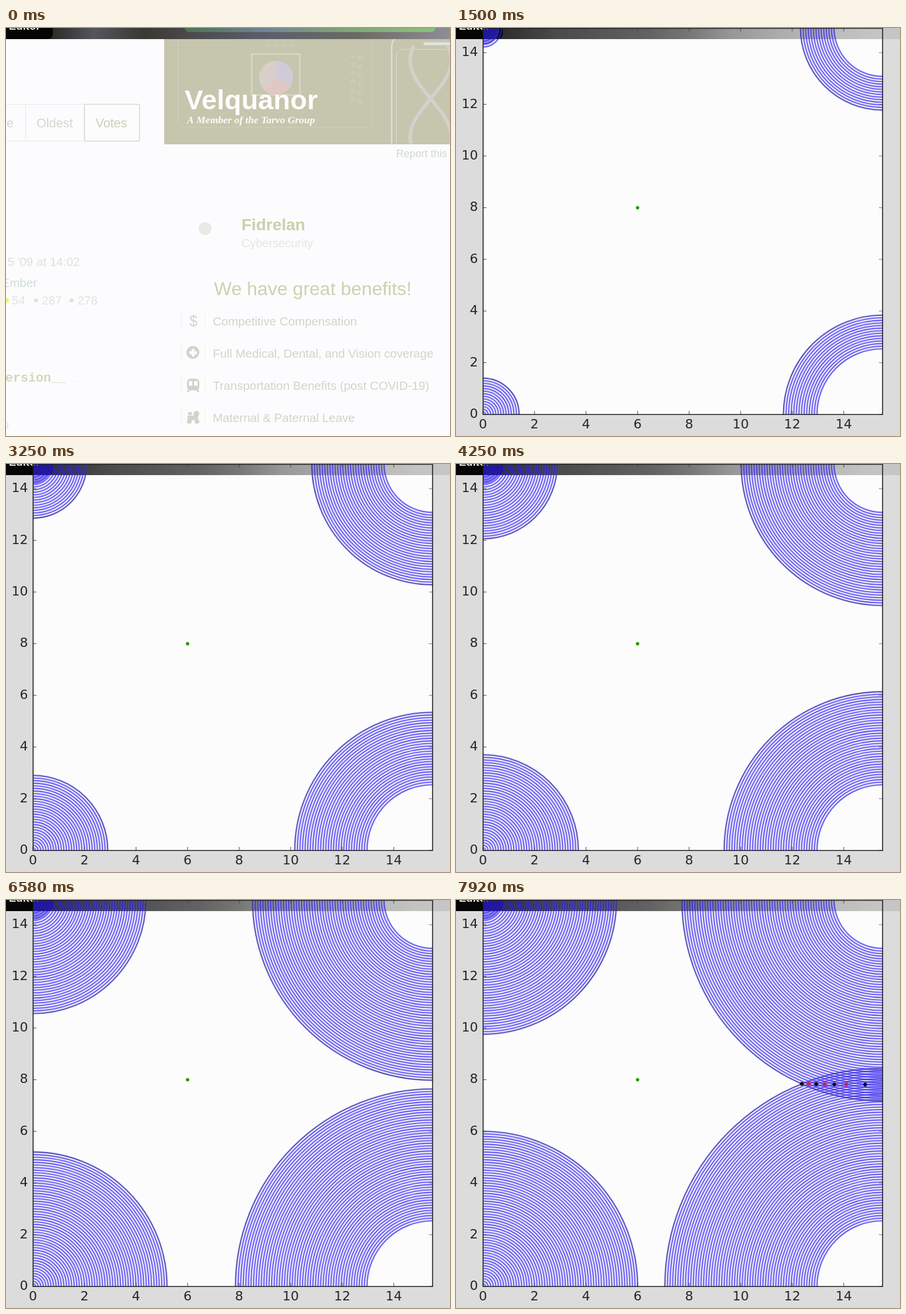
These frames come from a looping animation (758x698 px, 8 s). An HTML page with a canvas:

```html
<!DOCTYPE html>
<html lang="en">
<head>
<meta charset="utf-8">
<style>
  html, body { margin: 0; width: 100%; height: 100%; overflow: hidden; background: #dcdcdc; }
  canvas { display: block; }
</style>
</head>
<body>
<canvas id="stage" width="758" height="698"></canvas>
<script>
const g = document.getElementById('stage').getContext('2d');
const LOOP = 8000, PAGE_END = 80;
const SANS = '"Liberation Sans", Arial, sans-serif';
const SERIF = '"Liberation Serif", Times, serif';
const MONO = '"Liberation Mono", monospace';
const AXIS = '"DejaVu Sans", sans-serif';

// Plot box and units
const L = 46, R = 728, B = 661, UX = 44, UY = 44.2;
const px = x => L + x * UX, py = y => B - y * UY;

// Wave sources: centre and radius before the first ring
const sources = [
  { x: 0, y: 0, r: 0 },
  { x: 15.5, y: 0, r: 2.44 },
  { x: 15.5, y: 14.96, r: 1.78 },
  { x: 0, y: 14.94, r: -0.82 }
];

function rect(x, y, w, h, color) {
  g.fillStyle = color;
  g.fillRect(x, y, w, h);
}

function text(s, x, y, font, color, align = 'left') {
  g.font = font;
  g.fillStyle = color;
  g.textAlign = align;
  g.fillText(s, x, y);
}

function dot(x, y, r, color) {
  g.fillStyle = color;
  g.beginPath();
  g.arc(x, y, r, 0, 7);
  g.fill();
}

function line(color, width, ...pts) {
  g.strokeStyle = color;
  g.lineWidth = width;
  g.beginPath();
  for (let i = 0; i < pts.length; i += 2) g.lineTo(pts[i], pts[i + 1]);
  g.stroke();
}

function box(x, y, w, h, color, radius = 0, width = 1) {
  g.strokeStyle = color;
  g.lineWidth = width;
  g.beginPath();
  g.roundRect(x, y, w, h, radius);
  g.stroke();
}

function ramp(x0, x1, stops) {
  const grad = g.createLinearGradient(x0, 0, x1, 0);
  for (const [x, c] of stops) grad.addColorStop((x - x0) / (x1 - x0), c);
  return grad;
}

function strip(stops) {
  rect(80, 0, 678, 19, ramp(80, 758, stops));
  rect(0, 0, 82, 19, stops[0][1]);
  g.fillStyle = '#050505';
  g.beginPath();
  g.roundRect(-10, -20, 90, 39, 9);
  g.fill();
  text('Editor', 5, 3, 'bold 18.5px ' + SANS, '#e2e4dc');
}

function banner() {
  g.save();
  g.beginPath();
  g.rect(270, 19, 488, 180);
  g.clip();
  rect(270, 19, 488, 180, '#c6c5ae');
  box(293.5, 0, 331, 170, '#d0cfbc', 6);
  box(419.5, 44.5, 82, 70, '#dddcd0', 0, 2);
  dot(461, 85, 29, '#d8d0c8');
  [['#d0cbd8', -1.57, 0.5], ['#e2c8c4', 0.5, 2.3]].forEach(([c, a, b]) => {
    g.fillStyle = c;
    g.beginPath();
    g.moveTo(461, 85);
    g.arc(461, 85, 29, a, b);
    g.fill();
  });
  for (let i = 0; i < 6; i++) {
    for (const x of [592, 605]) box(x - 3, 44 + i * 15 + (x > 600 ? 4 : 0), 6, 6, '#d4d3c2', 3);
    if (i < 4) box(445 + i * 13, 27, 5, 5, '#d4d3c2', 3);
  }
  box(658.5, 13.5, 140, 220, '#e3e3da', 18, 2);
  box(666.5, 36.5, 130, 200, '#dcdcd0', 12);
  line('#e0e4dc', 5, 713, 27, 758, 27);
  g.strokeStyle = '#d2d1cb';
  g.lineWidth = 6;
  for (const s of [1, -1]) {
    g.beginPath();
    for (let y = 30; y < 200; y += 4) g.lineTo(725 + s * 35 * Math.cos((y - 55) / 42), y);
    g.stroke();
  }
  text('Velquanor', 305, 139, 'bold 47px ' + SANS, '#fdfdfb');
  text('A Member of the Tarvo Group', 309, 163, 'italic bold 17.5px ' + SERIF, '#fbfbf6');
  g.restore();
}

function icons() {
  const c = '#d3d3ca', w = '#fcfcfe';
  for (let i = 0; i < 4; i++) {
    const y = 501 + i * 55;
    line('#f0f0ec', 1, 299.5, y - 17, 299.5, y + 17);
    line('#f0f0ec', 1, 339.5, y - 17, 339.5, y + 17);
  }
  text('$', 320, 510, '25px ' + SANS, c, 'center');
  dot(319, 555, 11, c);
  rect(317, 549, 5, 13, w);
  rect(313, 553, 13, 5, w);
  g.fillStyle = c;
  g.beginPath();
  g.roundRect(309, 600, 21, 20, 6);
  g.fill();
  rect(312, 604, 6, 8, w);
  rect(321, 604, 6, 8, w);
  line(c, 3, 313, 619, 310, 623);
  line(c, 3, 326, 619, 329, 623);
  dot(325, 660, 5, c);
  rect(310, 663, 18, 8, c);
  dot(313, 673, 4, c);
  dot(326, 673, 4, c);
  rect(311, 657, 6, 5, c);
}

function page() {
  rect(0, 0, 758, 698, '#fcfcfe');
  banner();
  strip([[80, '#2c2c28'], [150, '#55555f'], [235, '#3a3832'], [320, '#4c4a4c'],
    [450, '#5c5f6c'], [600, '#6b6a62'], [758, '#8f8c98']]);
  g.fillStyle = ramp(305, 733, [[305, '#4f7054'], [450, '#6f8698'], [560, '#7fa078'], [733, '#8cc07c']]);
  g.beginPath();
  g.roundRect(305, -20, 428, 27, 8);
  g.fill();

  box(-5.5, 130.5, 139, 63, '#e8e8e2');
  line('#e8e8e2', 1, 33.5, 130, 33.5, 193);
  box(134, 130.5, 94, 63, '#d8d8cc', 2, 1.5);
  const tab = '21.5px ' + SANS;
  text('re', 13, 170, tab, '#d6d6d0', 'right');
  text('Oldest', 52, 170, tab, '#d6d6d0');
  text('Votes', 153, 170, tab, '#cdcdb4');

  const small = '20.5px ' + SANS;
  text("5 '09 at 14:02", 126, 407, small, '#dfdfda', 'right');
  text('Ember', 53, 443, small, '#d2dcd8', 'right');
  dot(1, 466, 4, '#f4f470');
  text('54', 10, 473, small, '#e2e2dc');
  dot(51, 466, 3.5, '#e2e2dc');
  text('287', 61, 473, small, '#e2e2dc');
  dot(112, 466, 3.5, '#e2e2d4');
  text('278', 122, 473, small, '#e2e2dc');
  text('ersion', -1, 605, 'bold 21.7px ' + MONO, '#d8d5bc');
  text('__', 77, 605, '21.7px ' + MONO, '#dedcce');
  rect(115, 603, 2, 2, '#e4e4dc');
  text('u', -5, 685, '18px ' + SANS, '#e0e0da');

  text('Report this', 666, 221, '18px ' + SANS, '#ced8d2');
  dot(340, 343, 11, '#e9e9e6');
  text('Fidrelan', 402, 346, 'bold 28px ' + SANS, '#cdcfaa');
  text('Cybersecurity', 402, 375, '20px ' + SANS, '#e5e5e2');
  text('We have great benefits!', 355, 457, '32px ' + SANS, '#cfd0b0');
  ['Competitive Compensation', 'Full Medical, Dental, and Vision coverage',
    'Transportation Benefits (post COVID-19)', 'Maternal & Paternal Leave']
    .forEach((s, i) => text(s, 353, 509 + i * 55, small, '#d3d4c8'));
  icons();
}

function ring(s, r, color, width) {
  g.strokeStyle = color;
  g.lineWidth = width;
  g.beginPath();
  g.ellipse(px(s.x), py(s.y), Math.abs(r) * UX, Math.abs(r) * UY, 0, 0, 7);
  g.stroke();
}

function rings(s, n) {
  for (let i = 1; i <= n; i++) {
    const r = s.r + i / 10;
    ring(s, r, 'rgba(70, 55, 255, 0.4)', 3.2);
    ring(s, r, i === n ? '#302c80' : 'rgba(25, 10, 215, 0.65)', 1.1);
  }
}

// Where the equal-numbered rings of the two right-hand sources meet
function crossings(n) {
  const [, low, high] = sources, d = high.y;
  for (let i = 1; i <= n; i++) {
    const a = low.r + i / 10, b = high.r + i / 10;
    const y = (d * d + a * a - b * b) / (2 * d);
    const half = a * a - y * y;
    if (half >= 0) dot(px(low.x - Math.sqrt(half)), py(y), 3.2, i % 2 ? '#e8124a' : '#0a0a18');
  }
}

function plot(n) {
  rect(0, 0, 758, 698, '#dcdcdc');
  rect(L, 0, R - L, B, '#fcfcfd');
  strip([[80, '#2e2e2e'], [170, '#4a4a4c'], [330, '#626262'], [400, '#777775'],
    [470, '#979799'], [560, '#aeaeae'], [700, '#c3c3c2'], [758, '#c6c6c6']]);

  g.save();
  g.beginPath();
  g.rect(L, 0, R - L, B);
  g.clip();
  for (const s of sources) rings(s, n);
  crossings(n);
  g.restore();

  dot(px(6), py(8), 3.1, '#7fd060');
  dot(px(6), py(8), 2.5, '#219410');

  const font = '22px ' + AXIS, ink = '#262626';
  for (let v = 0; v <= 14; v += 2) {
    const x = px(v), y = py(v);
    line('#444444', 1, x, B, x, B - 6);
    line('#444444', 1, x, 0, x, 6);
    line('#444444', 1, L, y, L + 6, y);
    line('#777777', 1, R - 6, y, R, y);
    text(v, x, 685, font, ink, 'center');
    text(v, 37.5, y + 6, font, ink, 'right');
  }
  box(L + 0.3, 0.5, R - L, B - 0.3, '#1c1c1c', 0, 1.6);
}

function draw(now) {
  const t = now % LOOP, s = t / 1000;
  // Rings are added ever more slowly
  if (t < PAGE_END) page();
  else plot(Math.floor(0.05 + 10 * s - 0.3 * s * s));
  requestAnimationFrame(draw);
}
requestAnimationFrame(draw);
</script>
</body>
</html>
```
